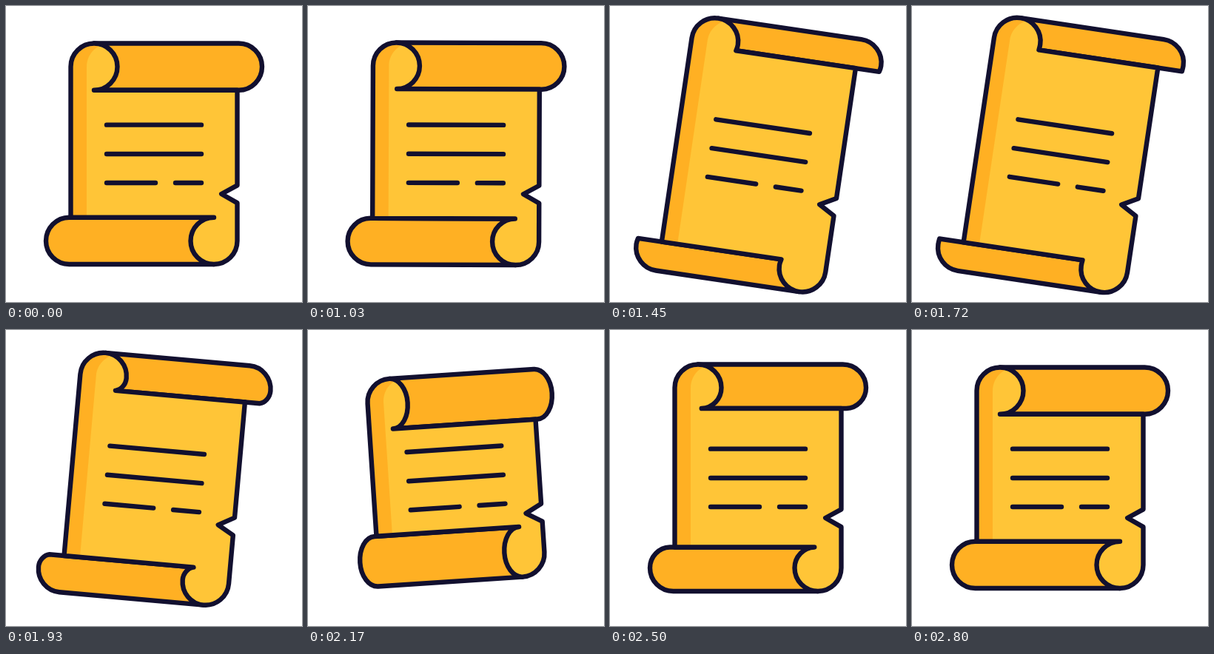
An HTML page with a canvas for the animation above (2.83 s loop, 400x400 px).

```html
<!DOCTYPE html>
<html lang="en">
<head>
<meta charset="utf-8">
<title>Scroll</title>
<style>
  html, body { margin: 0; width: 100%; height: 100%; overflow: hidden; background: #fff; }
  canvas { display: block; width: 100vmin; height: 100vmin; }
</style>
</head>
<body>
<canvas id="stage" width="400" height="400"></canvas>
<script>
const ctx = document.getElementById('stage').getContext('2d');

const LOOP = 2830, START = 1030, STEP = 30;
const INK = '#12102f', DARK = '#ffb023', LIGHT = '#ffc537';
const K = 0.5523;                       // circle-to-bezier ratio
const SIDE = 112.5, CURL_X = -81, ROLL_X = 114.5, R = 31.5, SHADE = 21.5;

// Roll shapes, measured from the scroll's centre.
const rest    = { top: -149.25, w: 31.5, mid: -117.75, tipX: 0,    tipY: -86,    out: 17.4, hx: 17.4, hy: 0 };
const stretch = { top: -174.75, w: 31.5, mid: -143.25, tipX: 30.2, tipY: -135.1, out: 2.75, hx: 0.7,  hy: -2.6 };
const squeeze = { top: -139.5,  w: 22.5, mid: -105.75, tipX: 0.5,  tipY: -71.75, out: 18.8, hx: 12.5, hy: 0 };

// time, stretch, squeeze, angle, x shift, y shift
const keys = [
  [1000, 0,     0,    0,    0,   0],
  [1030, 0.03,  0,    0.2,  0,   0],
  [1450, 1,     0,    8.4,  0.9, 1.6],
  [1640, 1.08,  0,    8.9,  1,   1.7],
  [1930, 0.59,  0.05, 5.1,  0.7, 1.5],
  [2170, 0,     1,    -3.8, 0,   0],
  [2500, 0.157, 0,    0,    0,   0],
  [2800, 0,     0,    0,    0,   0]
];

// Monotone cubic interpolation through the keys.
function rate(i, col) {
  return (keys[i + 1][col] - keys[i][col]) / (keys[i + 1][0] - keys[i][0]);
}

function tangent(i, col) {
  if (i === 0 || i === keys.length - 1) return 0;
  const a = rate(i - 1, col), b = rate(i, col);
  return a * b > 0 ? 2 * a * b / (a + b) : 0;
}

function sample(t, col) {
  const last = keys.length - 1;
  if (t <= keys[0][0] || t >= keys[last][0]) return 0;
  let i = 0;
  while (t >= keys[i + 1][0]) i++;
  const a = keys[i], b = keys[i + 1], d = b[0] - a[0], p = (t - a[0]) / d, q = 1 - p;
  return a[col] * q * q * (1 + 2 * p) + b[col] * p * p * (1 + 2 * q)
    + d * p * q * (tangent(i, col) * q - tangent(i + 1, col) * p);
}

function blend(s, q) {
  const c = {};
  for (const n in rest) c[n] = rest[n] + s * (stretch[n] - rest[n]) + q * (squeeze[n] - rest[n]);
  return c;
}

// k = 1 draws the top half, k = -1 the same half turned upside down.
function curve(path, k, ...v) {
  path.bezierCurveTo(...v.map(n => n * k));
}

function curl(path, c, x, k) {
  const side = x + c.w, tip = x + c.tipX;
  curve(path, k, x + K * c.w, c.top, side, c.mid - K * (c.mid - c.top), side, c.mid);
  curve(path, k, side, c.mid + c.out, tip + c.hx, c.tipY + c.hy, tip, c.tipY);
}

function corner(path, c, x, k) {
  const y = c.top + R, h = R * (1 - K);
  path.lineTo(k * x, k * y);
  curve(path, k, x, c.top + h, x + h, c.top, x + R, c.top);
}

function rollPath(c, k) {
  const p = new Path2D();
  p.moveTo(k * CURL_X, k * c.top);
  p.lineTo(k * ROLL_X, k * c.top);
  curl(p, c, ROLL_X, k);
  p.lineTo(k * (CURL_X + c.tipX), k * c.tipY);
  return p;
}

function paperPath(c) {
  const p = new Path2D();
  p.moveTo(-SIDE, 0);
  corner(p, c, -SIDE, 1);
  curl(p, c, CURL_X, 1);
  p.lineTo(SIDE, c.tipY);
  p.lineTo(SIDE, 42.6);
  p.lineTo(91.2, 54.2);
  p.lineTo(SIDE, 66.4);
  corner(p, c, -SIDE, -1);
  curl(p, c, CURL_X, -1);
  p.lineTo(-SIDE, -c.tipY);
  p.closePath();
  return p;
}

function lightPath(c) {
  const p = new Path2D();
  p.moveTo(SHADE - SIDE, 220);
  corner(p, c, SHADE - SIDE, 1);
  p.lineTo(220, c.top);
  p.lineTo(220, 220);
  return p;
}

function textLine(x1, x2, y) {
  ctx.beginPath();
  ctx.moveTo(x1, y);
  ctx.lineTo(x2, y);
  ctx.stroke();
}

function draw(t) {
  const c = blend(sample(t, 1), sample(t, 2));
  ctx.fillStyle = '#fff';
  ctx.fillRect(0, 0, 400, 400);
  ctx.save();
  ctx.translate(200 + sample(t, 4), 199.75 + sample(t, 5));
  ctx.rotate(sample(t, 3) * Math.PI / 180);
  ctx.strokeStyle = INK;
  ctx.lineWidth = 6.4;
  ctx.lineCap = ctx.lineJoin = 'round';

  ctx.fillStyle = DARK;
  for (const k of [1, -1]) {
    const roll = rollPath(c, k);
    ctx.fill(roll);
    ctx.stroke(roll);
  }

  const paper = paperPath(c);
  ctx.fill(paper);
  ctx.save();
  ctx.clip(paper);
  ctx.fillStyle = LIGHT;
  ctx.fill(lightPath(c));
  ctx.restore();
  ctx.stroke(paper);

  textLine(-64, 64, -39.1);
  textLine(-64, 64, 0.2);
  textLine(-64, 2, 39.3);
  textLine(29, 64, 39.3);
  ctx.restore();
}

function tick() {
  const t = performance.now() % LOOP;
  draw(t < START ? 0 : START + Math.floor((t - START) / STEP) * STEP);
  requestAnimationFrame(tick);
}
tick();
</script>
</body>
</html>
```
